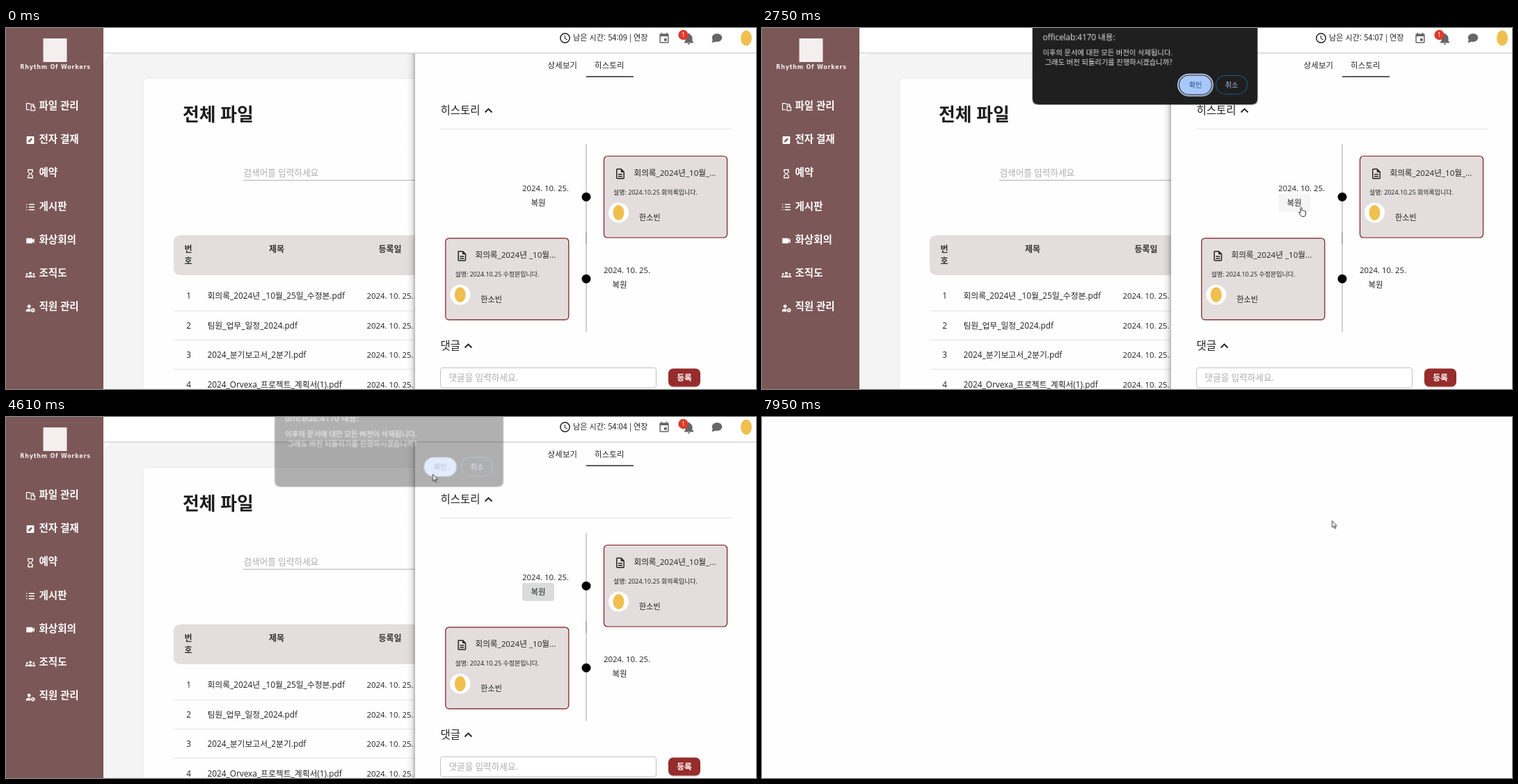
These frames come from a looping animation (1078 by 520 pixels, 8000 ms). An HTML page:

```html
<!DOCTYPE html>
<html lang="ko">
<head>
<meta charset="utf-8">
<title>파일 히스토리</title>
<style>
html, body { margin: 0; width: 100%; height: 100%; overflow: hidden; background: #fff; }
svg.stage { display: block; width: 100vw; height: 100vh; }
text { font-family: "Open Sans", "Noto Sans CJK KR", sans-serif; font-size: 11.6px; fill: #222; white-space: pre; }
.mid { text-anchor: middle; }
.cjk { font-family: "Noto Sans CJK KR", sans-serif; font-size: 11.1px; }
.menu text { font-size: 14.5px; font-weight: 700; fill: #fff; }
.menu use { fill: #fff; color: #fff; }
.tagline { font: 700 8px "DejaVu Sans", sans-serif; letter-spacing: .8px; fill: #f4eeee; }
.title { font-size: 25.8px; font-weight: 700; fill: #1c1c1c; }
.head text, .bold { font-weight: 700; font-size: 12px; }
.head text { fill: #333; }
.rows text { font-size: 11.8px; }
.rows .date, .date { font-size: 11.4px; }
.tab { font-size: 11.3px; letter-spacing: .3px; }
.section { font-size: 15.5px; }
.hint { font-size: 12.6px; fill: #adadad; }
.small { font-size: 8.95px; }
.name { font-size: 11.1px; }
.restore { font-size: 11.5px; }
.line { stroke: #e4e4e4; fill: none; }
.tool { fill: #666; }
.dialog text { fill: #e6e6e6; font-size: 10.3px; }
.dialog .host { font-size: 11.7px; }

/* One cycle is 8 s: 1% = 80 ms. */
.anim { animation: 8s step-end infinite; }
.t9 { animation-name: t9; } .t8 { animation-name: t8; }
.t7 { animation-name: t7; } .t4 { animation-name: t4; }
@keyframes t9 { 0% { opacity: 1 } 5.375%, 100% { opacity: 0 } }
@keyframes t8 { 0% { opacity: 0 } 5.375% { opacity: 1 } 22%, 100% { opacity: 0 } }
@keyframes t7 { 0% { opacity: 0 } 22% { opacity: 1 } 56%, 100% { opacity: 0 } }
@keyframes t4 { 0% { opacity: 0 } 56%, 100% { opacity: 1 } }

.one { animation-name: one; } .two { animation-name: two; }
@keyframes one { 0% { opacity: 1 } 62.375%, 100% { opacity: 0 } }
@keyframes two { 0% { opacity: 0 } 62.375%, 100% { opacity: 1 } }

.hover { animation-name: hover; }
@keyframes hover {
  0% { opacity: 0; fill: #f5f5f5 }
  32.5% { opacity: 1; fill: #f5f5f5 }
  54% { opacity: 1; fill: #d9dcdb }
  59.125%, 100% { opacity: 0; fill: #f5f5f5 }
}
.dialog { animation-name: dialog; transform-origin: 550.5px 0; }
@keyframes dialog {
  0% { opacity: 0; transform: none }
  32.5% { opacity: .4; transform: translateY(-11px) scale(1.015) }
  34.375% { opacity: 1; transform: none }
  56% { opacity: .915; transform: translateY(-8.7px) scale(1.009) }
  57.5% { opacity: .35; transform: translateY(-11.5px) scale(1.016) }
  59.125%, 100% { opacity: 0; transform: none }
}
.ring { animation-name: ring; }
@keyframes ring { 0% { opacity: 1 } 54%, 100% { opacity: 0 } }
.ok { animation-name: ok; }
@keyframes ok { 0% { fill: #a8c7fa } 47% { fill: #a3bdec } 54%, 100% { fill: #b0cbfa } }
.blank { animation-name: blank; }
@keyframes blank { 0% { opacity: 0 } 78.375%, 100% { opacity: 1 } }

.arrow { animation-name: arrow; }
@keyframes arrow {
  0% { opacity: 0; transform: translate(1031px, 258px) }
  15% { opacity: 1; transform: translate(1031px, 258px) }
  16.625% { transform: translate(901px, 254px) }
  18.5% { transform: translate(784px, 242px) }
  22% { opacity: 0; transform: translate(784px, 242px) }
  40.125% { opacity: 1; transform: translate(555px, 130px) }
  41.875% { transform: translate(590px, 108px) }
  43.5% { transform: translate(612px, 92px) }
  45.25% { transform: translate(622px, 78px) }
  47% { transform: translate(612.5px, 82.5px) }
  49% { transform: translate(605px, 75px) }
  52.25% { transform: translate(612px, 80px) }
  54% { transform: translate(613.5px, 82.5px) }
  89.5% { transform: translate(609px, 93px) }
  91.125% { transform: translate(596px, 114px) }
  92.75% { transform: translate(588.5px, 140px) }
  94.375% { transform: translate(612px, 164px) }
  96% { transform: translate(660px, 169px) }
  97.75% { transform: translate(752px, 164px) }
  99.375%, 100% { opacity: 1; transform: translate(819.5px, 149.5px) }
}
.hand { animation-name: hand; }
@keyframes hand {
  0% { opacity: 0; transform: translate(767px, 253px) }
  22% { opacity: 1; transform: translate(767px, 253px) }
  32.5% { transform: translate(771px, 258px) }
  40.125%, 100% { opacity: 0; transform: translate(771px, 258px) }
}
</style>
</head>
<body>
<svg class="stage" viewBox="0 0 1078 520" xmlns="http://www.w3.org/2000/svg">
<defs>
  <linearGradient id="edge">
    <stop offset="0" stop-color="#000" stop-opacity="0"/>
    <stop offset=".6" stop-color="#000" stop-opacity=".07"/>
    <stop offset="1" stop-color="#000" stop-opacity=".27"/>
  </linearGradient>
  <!-- Icons are drawn on a 24-unit grid centred on the origin. -->
  <g id="clock"><path transform="translate(-12 -12)" d="M12 2a10 10 0 1 0 0 20a10 10 0 0 0 0-20zm0 18a8 8 0 1 1 0-16a8 8 0 0 1 0 16zM12.5 7H11v6l5.25 3.15.75-1.23-4.5-2.67z"/></g>
  <g id="calendar"><path transform="translate(-12 -12)" d="M17 12h-5v5h5zM16 1v2H8V1H6v2H5a2 2 0 0 0-2 2v14a2 2 0 0 0 2 2h14a2 2 0 0 0 2-2V5a2 2 0 0 0-2-2h-1V1zm3 18H5V8h14z"/></g>
  <g id="bell"><path transform="translate(-12 -12)" d="M12 22a2 2 0 0 0 2-2h-4a2 2 0 0 0 2 2zm6-6v-5c0-3.07-1.64-5.64-4.5-6.32V4a1.5 1.5 0 0 0-3 0v.68C7.63 5.36 6 7.92 6 11v5l-2 2v1h16v-1z"/></g>
  <g id="doc"><path transform="translate(-12 -12)" d="M8 16h8v2H8zm0-4h8v2H8zm6-10H6a2 2 0 0 0-2 2v16a2 2 0 0 0 2 2h12a2 2 0 0 0 2-2V8zm4 18H6V4h7v5h5z"/></g>
  <g id="up"><path d="M-6 3L0-3L6 3" fill="none" stroke="#222" stroke-width="2.3"/></g>
  <g id="folder"><path d="M-8 7h-2V-8h7l2 2h8v4M-8 7h6" fill="none" stroke="currentColor" stroke-width="2"/><path d="M0-3h7l4 4v9H0zm2 2v9h7V2H6v-3z"/></g>
  <g id="edit"><path fill-rule="evenodd" d="M-7-9H7a2 2 0 0 1 2 2V7a2 2 0 0 1-2 2H-7a2 2 0 0 1-2-2V-7a2 2 0 0 1 2-2zM-5 5h3L5-2L2-5L-5 2z"/></g>
  <g id="glass"><path transform="translate(-12 -12)" d="M6 2v6l4 4-4 4v6h12v-6l-4-4 4-4V2zm10 14.5V20H8v-3.5l4-4zm-4-5l-4-4V4h8v3.5z"/></g>
  <g id="list"><path d="M-9.5-6h2m4 0h13m-19 6h2m4 0h13m-19 6h2m4 0h13" fill="none" stroke="currentColor" stroke-width="2.4"/></g>
  <g id="video"><path d="M-9-6H5v4.5l4-4v11l-4-4V6H-9z"/></g>
  <g id="people"><circle cy="-3" r="3.3"/><path d="M-6 7V4.5C-6 1 6 1 6 4.5V7z"/><circle cx="-8" cy="-1" r="2.2"/><circle cx="8" cy="-1" r="2.2"/><path d="M-12 7V4.5q2-3 5-2.3V7zM12 7V4.5q-2-3-5-2.3V7z"/></g>
  <g id="manager"><circle cx="-3" cy="-4" r="4"/><path d="M-10 8V5Q-8 1 0 2q-1 3 1 6z"/><circle cx="6" cy="5" r="3" fill="none" stroke="currentColor" stroke-width="2.4"/><path d="M6-.5v11M.5 5h11M2 1l8 8M10 1l-8 8" stroke="currentColor" stroke-width="1.3" stroke-dasharray="2.5 6"/></g>
  <g id="card">
    <rect x=".5" y=".5" width="177" height="117.5" rx="5" fill="#e3dddd" stroke="#7b1b20" stroke-width="1.2"/>
    <use href="#doc" transform="translate(24 26) scale(.74)" fill="#222"/>
    <circle cx="21.5" cy="82" r="14.5" fill="#fff"/>
    <ellipse cx="21.5" cy="82" rx="8" ry="11" fill="#efc050"/>
    <text class="name" x="51" y="93">한소빈</text>
  </g>
</defs>

<rect width="1078" height="520" fill="#fff"/>

<!-- File list -->
<path d="M140 520V56Q140 37 159 37H588V520z" fill="#f4f4f4"/>
<path d="M197.5 520V79Q197.5 72.5 204 72.5H588V520z" fill="#fefefe" stroke="#ebebeb"/>
<text class="title" x="254" y="134">전체 파일</text>
<text class="hint" x="341.5" y="212.5">검색어를 입력하세요</text>
<path d="M341 219.3H588" stroke="#a8a8a8" stroke-width=".9"/>
<path d="M588 298.5H252Q241 298.5 241 309V346Q241 356 252 356H588z" fill="#e3dddd"/>
<g class="head mid">
  <text x="262" y="323">번</text><text x="262" y="340">호</text>
  <text x="389" y="323">제목</text><text x="552" y="323">등록일</text>
</g>
<path class="line" d="M241 407.5H588M241 449.5H588M241 491.5H588"/>
<g class="rows">
  <text class="mid" x="262.5" y="390">1</text><text x="289.5" y="390">회의록_2024년 _10월_25일_수정본.pdf</text><text class="date" x="518.5" y="390">2024. 10. 25.</text>
  <text class="mid" x="262.5" y="432.5">2</text><text x="289.5" y="432.5">팀원_업무_일정_2024.pdf</text><text class="date" x="518.5" y="432.5">2024. 10. 25.</text>
  <text class="mid" x="262.5" y="475">3</text><text x="289.5" y="475">2024_분기보고서_2분기.pdf</text><text class="date" x="518.5" y="475">2024. 10. 25.</text>
  <text class="mid" x="262.5" y="517.5">4</text><text x="289.5" y="517.5">2024_Orvexa_프로젝트_계획서(1).pdf</text><text class="date" x="518.5" y="517.5">2024. 10. 25.</text>
</g>

<!-- Side panel -->
<rect x="576" y="37" width="12" height="483" fill="url(#edge)"/>
<rect x="588" y="36" width="490" height="484" fill="#fefefe"/>
<text class="tab" x="778.5" y="57.5">상세보기</text>
<text class="tab" x="846" y="57.5">히스토리</text>
<rect x="834" y="69.3" width="68" height="1.6" fill="#333"/>
<text class="section" x="624.5" y="123.5">히스토리</text>
<use href="#up" transform="translate(693.5 119) scale(.82)"/>
<path class="line" d="M624 145.5H1043"/>
<path d="M834 167V438" stroke="#c6c6c6" stroke-width="1.6"/>
<path d="M834 294V311" stroke="#a6a6a6" stroke-width="1.6"/>
<g stroke="#000" stroke-opacity=".15"><circle cx="834" cy="243.3" r="6.4"/><circle cx="834" cy="361.3" r="6.4"/></g>
<use href="#card" x="859" y="184"/>
<text x="902.5" y="213">회의록_2024년_10월_...</text>
<text class="small" x="873" y="239.5">설명: 2024.10.25 회의록입니다.</text>
<use href="#card" x="631.3" y="302.3"/>
<text x="674.5" y="331">회의록_2024년 _10월...</text>
<text class="small" x="645.5" y="357.5">설명: 2024.10.25 수정본입니다.</text>
<text class="date" x="742" y="235">2024. 10. 25.</text>
<rect class="anim hover" x="742" y="239" width="46" height="26" rx="3"/>
<text class="restore" x="754.5" y="256">복원</text>
<text class="date" x="859" y="353">2024. 10. 25.</text>
<text class="restore" x="871.5" y="374">복원</text>
<text class="section" x="624.5" y="462.5">댓글</text>
<use href="#up" transform="translate(664.5 458) scale(.82)"/>
<rect x="624.5" y="489.5" width="310" height="28.5" rx="3" fill="#fff" stroke="#c2c2c2"/>
<text class="hint" x="636.5" y="508.2">댓글을 입력하세요.</text>
<rect x="952" y="492" width="46" height="26" rx="7" fill="#000" opacity=".18"/>
<rect x="952" y="490.5" width="46" height="26" rx="7" fill="#962c2b"/>
<text class="bold mid" x="975" y="507.8" style="fill:#fff;font-size:11.8px">등록</text>

<!-- Top bar -->
<rect x="140" width="938" height="36" fill="#fff"/>
<path d="M140 36H1078" stroke="#c9c9c9"/>
<path d="M140 37H1078" stroke="#000" opacity=".05"/>
<use href="#clock" transform="translate(803.5 14.5) scale(.74)" fill="#222"/>
<text class="cjk anim t9" x="815" y="18">남은 시간: 54:09 | 연장</text>
<text class="cjk anim t8" x="815" y="18">남은 시간: 54:08 | 연장</text>
<text class="cjk anim t7" x="815" y="18">남은 시간: 54:07 | 연장</text>
<text class="cjk anim t4" x="815" y="18">남은 시간: 54:04 | 연장</text>
<g class="tool">
  <use href="#calendar" transform="translate(946 15) scale(.74)"/>
  <use href="#bell" transform="translate(981.5 15.5) scale(.84)"/>
  <ellipse cx="1022" cy="14" rx="7.3" ry="6"/><path d="M1016 16L1014.5 21Q1018 21 1021 18.5z"/>
</g>
<circle cx="973.5" cy="10" r="7.2" fill="#dd3a2c"/>
<g class="mid">
  <text class="anim one" x="973.5" y="13.3" style="fill:#fff;font-size:9px">1</text>
  <text class="anim two" x="973.5" y="13.3" style="fill:#fff;font-size:9px">2</text>
</g>
<ellipse cx="1064" cy="14.5" rx="8" ry="11" fill="#efc050"/>

<!-- Dialog -->
<g class="anim dialog">
  <path d="M388 0V102Q388 111 397 111H704Q713 111 713 102V0z" fill="#000" opacity=".3"/>
  <path d="M389 -12V102Q389 110 397 110H704Q712 110 712 102V-12z" fill="#1f1f1f"/>
  <text class="host" x="403.5" y="17.8">officelab:4170 내용:</text>
  <text x="403.5" y="38.8">이후의 문서에 대한 모든 버전이 삭제됩니다.</text>
  <text x="404" y="53"> 그래도 버전 되돌리기를 진행하시겠습니까?</text>
  <rect class="anim ring" x="598" y="66.5" width="50" height="31" rx="15.5" fill="#1f1f1f" stroke="#c3d7fb" stroke-width="1.7"/>
  <rect class="anim ok" x="600" y="68.5" width="46" height="27" rx="13.5"/>
  <text class="mid" x="623" y="85.5" style="fill:#174a86;font-size:10px">확인</text>
  <rect x="652.5" y="68.5" width="45" height="26.5" rx="13.2" fill="none" stroke="#1d5f8c"/>
  <text class="mid" x="675" y="85.5" style="fill:#a8c7fa;font-size:10px">취소</text>
</g>

<!-- Sidebar -->
<rect width="140" height="520" fill="#7c5757"/>
<rect x="53.5" y="15" width="34" height="34" fill="#f4eeee"/>
<text class="tagline mid" x="71" y="59">Rhythm Of Workers</text>
<g class="menu">
  <use href="#folder" transform="translate(35.5 113.5) scale(.6)"/><text x="47.5" y="116.5">파일 관리</text>
  <use href="#edit" transform="translate(35 161.5) scale(.6)"/><text x="47.5" y="164.8">전자 결재</text>
  <use href="#glass" transform="translate(35 210) scale(.64)"/><text x="47.5" y="213">예약</text>
  <use href="#list" transform="translate(35 258) scale(.62)"/><text x="47.5" y="261.5">게시판</text>
  <use href="#video" transform="translate(35 306.5) scale(.64)"/><text x="47.5" y="309.7">화상회의</text>
  <use href="#people" transform="translate(35 355) scale(.6)"/><text x="47.5" y="358">조직도</text>
  <use href="#manager" transform="translate(35 403.5) scale(.62)"/><text x="47.5" y="406.3">직원 관리</text>
</g>

<rect class="anim blank" width="1078" height="520" fill="#fefefe"/>

<!-- Pointers -->
<path class="anim arrow" d="M0 0V9.6L2.2 7.7L3.8 11.2L5.3 10.5L3.8 7.2H6.7z" fill="#fff" stroke="#222" stroke-width=".9"/>
<path class="anim hand" d="M3 8.5V1.5Q3 .5 4 .5T5 1.5V5Q6.5 4.3 7 5.3Q8.5 4.8 8.8 5.8Q10.5 5.5 10.5 7V10Q10.5 13.5 8 13.5H5.5Q4 13.5 3 11.5L.8 8.5Q.3 7 1.5 7z" fill="#fff" stroke="#222" stroke-width=".9"/>
</svg>
</body>
</html>
```
